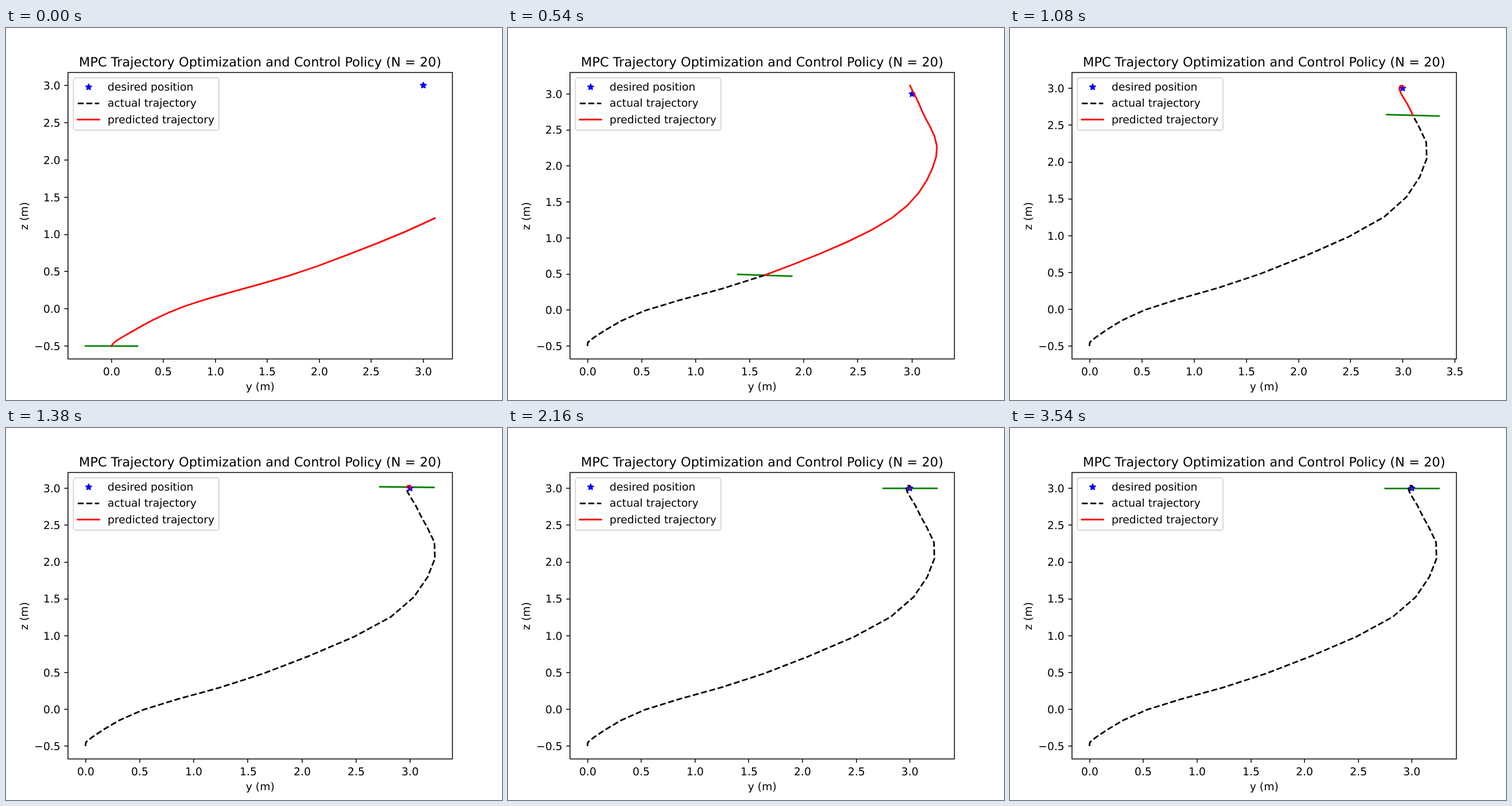
Recreate the animation shown at these times as an HTML page. Size 864 px wide and 648 px high, loop 3.6 s.

```html
<!DOCTYPE html>
<html lang="en">
<head>
<meta charset="utf-8">
<title>MPC trajectory</title>
<style>
  html, body { margin: 0; width: 100%; height: 100%; overflow: hidden; background: #fff; }
  svg { display: block; width: 864px; height: 648px; }
  text { font: 18.75px "DejaVu Sans", sans-serif; text-rendering: geometricPrecision; }
  .title { font-size: 22.5px; }
  .mid { text-anchor: middle; }
  .end { text-anchor: end; }
  .axis { fill: none; stroke: #000; stroke-width: 1.5; }
  .line { fill: none; stroke-width: 2.8125; stroke-linecap: square; stroke-linejoin: round; }
  .actual { stroke: #000; stroke-linecap: butt; stroke-dasharray: 10.406 4.5; }
  .plan { stroke: #f00; }
  .body { stroke: #008000; }
  .star { fill: #00f; stroke: #00f; stroke-width: 1.875; stroke-linejoin: bevel; }
</style>
</head>
<body>
<svg viewBox="0 0 864 648">
  <rect width="864" height="648" fill="#fff"/>
  <text class="title mid" x="442.6" y="67">MPC Trajectory Optimization and Control Policy (N = 20)</text>
  <text class="mid" x="442.8" y="631">y (m)</text>
  <text class="mid" transform="translate(38 327.5) rotate(-90)">z (m)</text>
  <g id="ticks"></g>
  <path id="body" class="line body"/>
  <path id="goal" class="star"/>
  <path id="actual" class="line actual"/>
  <path id="plan" class="line plan"/>
  <rect class="axis" x="108" y="77.5" width="669.6" height="499"/>
  <rect x="117.4" y="87" width="253.5" height="91" rx="3.75" fill="#fff" stroke="#ccc" stroke-width="1.875" stroke-opacity=".8"/>
  <path id="key" class="star"/>
  <path class="line actual" d="M125 131.3H162.4"/>
  <path class="line plan" d="M125 159.5H162.4"/>
  <text x="177" y="109">desired position</text>
  <text x="177" y="137">actual trajectory</text>
  <text x="177" y="166">predicted trajectory</text>
</svg>
<script>
const STEP = 60, STEPS = 60, HORIZON = 20, RATE = 0.6;
const GOAL = [3, 3], ARM = 0.25, LEAN = 3.7;
const BOX = { left: 108, right: 777.6, top: 77.76, bottom: 576.72 };
const $ = id => document.getElementById(id);

// Way points of the flight, three steps apart.
const route = [
  [0, -.5], [.055, -.385], [.53, -.008], [1.638, .483], [2.82, 1.254], [3.228, 2.048], [3.095, 2.635],
  [2.976, 2.95], [2.974, 3.031], [2.997, 3.033], [3.005, 3.022], [3.003, 3.008], [3.001, 3.002], GOAL
];
// How far the end of a plan misses the later flight, 4.5 steps apart.
const misses = [[.48, .125], [-.14, .462], [-.01, .208], [0, .05], [0, 0]];

// Catmull-Rom spline that rests at both ends.
function spline(pts, t) {
  const last = pts.length - 1;
  t = Math.min(Math.max(t, 0), last);
  const i = Math.min(Math.floor(t), last - 1), u = t - i;
  const at = n => pts[Math.min(Math.max(n, 0), last)];
  return [0, 1].map(c => {
    const [a, b, d, e] = [i - 1, i, i + 1, i + 2].map(n => at(n)[c]);
    return b + .5 * u * (d - a + u * (2 * a - 5 * b + 4 * d - e + u * (3 * (b - d) + e - a)));
  });
}

const list = (length, f) => Array.from({ length }, (_, i) => f(i));
const flown = k => spline(route, k / 3);

// A plan runs ahead along the flight and strays further with every step.
function predict(k) {
  const miss = spline(misses, k / 4.5);
  return list(HORIZON, i => {
    const stray = (i / (HORIZON - 1)) ** 1.5;
    return flown(k + RATE * i).map((v, c) => v + miss[c] * stray);
  });
}

// The body leans with its sideways acceleration.
function bodyAt(k) {
  const [x, z] = flown(k);
  const tilt = -LEAN * (flown(k + 2)[0] - 2 * x + flown(k - 2)[0]) / 4;
  const dx = ARM * Math.cos(tilt), dz = ARM * Math.sin(tilt);
  return [[x - dx, z - dz], [x + dx, z + dz]];
}

function scale(values, from, to) {
  const lo = Math.min(...values), hi = Math.max(...values), pad = (hi - lo) * .05;
  const f = v => from + (v - lo + pad) / (hi - lo + 2 * pad) * (to - from);
  f.ticks = [];
  for (let v = Math.ceil((lo - pad) * 2) / 2; v <= hi + pad; v += .5) f.ticks.push(v);
  return f;
}

const toPath = pts => 'M' + pts.map(p => p.map(v => v.toFixed(2)).join(' ')).join('L');

const star = (x, y) => toPath(list(10, i => {
  const r = 5.625 * (i % 2 ? .382 : 1), a = i * Math.PI / 5;
  return [Math.round(x) + r * Math.sin(a), Math.round(y) - r * Math.cos(a)];
})) + 'Z';

const label = v => (v < 0 ? '\u2212' : '') + Math.abs(v).toFixed(1);

function draw(k) {
  const path = list(k + 1, flown), plan = predict(k), body = bodyAt(k);
  const all = [...path, ...plan, ...body, GOAL];
  const X = scale(all.map(p => p[0]), BOX.left, BOX.right);
  const Y = scale(all.map(p => p[1]), BOX.bottom, BOX.top);
  const trace = pts => toPath(pts.map(([x, z]) => [X(x), Y(z)]));

  $('body').setAttribute('d', trace(body));
  $('actual').setAttribute('d', trace(path));
  $('plan').setAttribute('d', trace(plan));
  $('goal').setAttribute('d', star(X(GOAL[0]), Y(GOAL[1])));
  $('ticks').innerHTML =
    X.ticks.map(v => `<path class="axis" d="M${Math.round(X(v))} 576.5v6.56"/>
      <text x="${Math.round(X(v) - 14.9)}" y="604.5">${label(v)}</text>`).join('') +
    Y.ticks.map(v => `<path class="axis" d="M108 ${Math.round(Y(v))}h-6.56"/>
      <text class="end" x="94.8" y="${Math.round(Y(v) + 6.84)}">${label(v)}</text>`).join('');
}

$('key').setAttribute('d', star(144, 103));

let start = null, shown = 0;
function tick(now) {
  if (start === null) start = now;
  const k = Math.floor((now - start) / STEP) % STEPS;
  if (k !== shown) draw(shown = k);
  requestAnimationFrame(tick);
}
draw(0);
requestAnimationFrame(tick);
</script>
</body>
</html>
```
